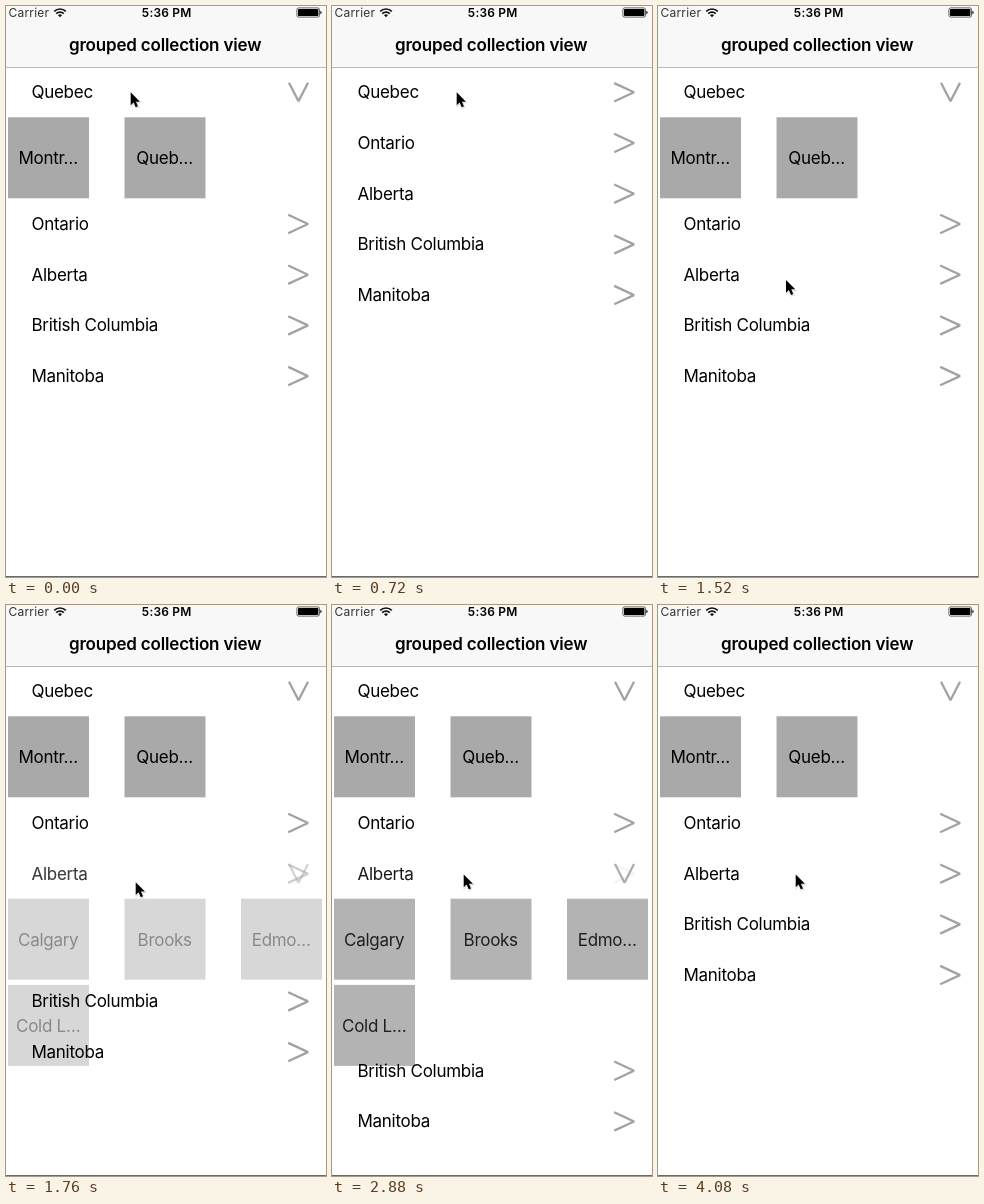
Animation, 320 px wide and 571 px high, one loop 4960 ms. Source, as an HTML page:

```html
<!DOCTYPE html>
<html lang="en">
<head>
<meta charset="utf-8">
<title>Grouped collection view</title>
<style>
  html, body { margin: 0; width: 100%; height: 100%; overflow: hidden; background: #fff; }
  svg { display: block; width: 100%; height: 100%; font-family: Inter, Roboto, sans-serif; }
  .label { font-size: 17px; letter-spacing: -.28px; }
  .cell { text-anchor: middle; }
  .status { font-size: 12px; letter-spacing: .2px; }
  .arrow { fill: none; stroke: #a2a2a2; stroke-width: 2.3; stroke-linejoin: bevel; }
</style>
</head>
<body>
<svg id="stage" viewBox="0 0 320 571">
  <rect width="320" height="571" fill="#fff"/>
  <g id="cells"></g>
  <g id="headers"></g>

  <rect width="320" height="61" fill="#f8f8f8"/>
  <rect y="61" width="320" height="1" fill="#b9b9b9"/>
  <rect y="570" width="320" height="1" fill="#6a6a6a"/>
  <text x="2.5" y="11" class="status" fill="#333">Carrier</text>
  <g fill="none" stroke="#111" stroke-width="1.7">
    <path d="M48.2 5.4a8.2 8.2 0 0 1 11.6 0M50.2 7.6a5.4 5.4 0 0 1 7.6 0"/>
    <path d="M54 11.3L52 9.2a2.9 2.9 0 0 1 4 0Z" fill="#111" stroke="none"/>
  </g>
  <text x="160.7" y="11" class="status" font-weight="600" text-anchor="middle">5:36 PM</text>
  <rect x="290.9" y="1.9" width="22.6" height="9.2" rx="1.8" fill="none" stroke="#000" stroke-width=".6"/>
  <rect x="292" y="3" width="20.4" height="7" rx=".8"/>
  <path d="M314.4 4.8a1.8 1.8 0 0 1 0 3.4Z"/>
  <text x="159.1" y="44.5" font-size="17" font-weight="600" letter-spacing="-.18" text-anchor="middle">grouped collection view</text>

  <g id="cursor">
    <path d="M.6 1.4V15.6L3.8 12.6L6.2 18L9 16.8L6.7 11.6H11Z" opacity=".14" stroke="#000" stroke-width="1.6"/>
    <path d="M0 0V14.6L3.3 11.5L5.7 17L8.3 15.9L6 10.6H10.5Z" stroke="#fff" stroke-width="1.2" paint-order="stroke"/>
  </g>
</svg>
<script>
const LOOP = 4960, STEP = 80, TOP = 86.3, ROW = 50.7, SIDE = 81, GAP = 86.2;
const COLUMNS = [2, 118.5, 235];

const groups = [
  { name: "Quebec", items: ["Montr…", "Queb…"], y: TOP, grow: 81 },
  { name: "Ontario" },
  { name: "Alberta", items: ["Calgary", "Brooks", "Edmo…", "Cold L…"], y: TOP + 2 * ROW + 81, grow: 167.2 },
  { name: "British Columbia" },
  { name: "Manitoba" }
];

// Pointer stops: time, x, y
const pointer = [
  [0, 124.7, 86.3], [1060, 124.7, 86.3], [1520, 128, 274], [1600, 129.7, 277.2],
  [2160, 129.7, 277.2], [2320, 131.7, 269.4], [3840, 131.7, 269.4], [4080, 137.7, 269.4]
];

const byId = id => document.getElementById(id);

function add(parent, tag, attrs, text) {
  const el = document.createElementNS("http://www.w3.org/2000/svg", tag);
  for (const key in attrs) el.setAttribute(key, attrs[key]);
  if (text) el.textContent = text;
  return parent.appendChild(el);
}

function ease(t, from, to) {
  const x = Math.min(1, Math.max(0, (t - from) / (to - from)));
  return x * x * (3 - 2 * x);
}

function buildCells(group) {
  const box = add(byId("cells"), "g", {});
  group.items.forEach((name, i) => {
    const x = COLUMNS[i % 3], y = group.y + 25 + Math.floor(i / 3) * GAP;
    add(box, "rect", { x, y, width: SIDE, height: SIDE, fill: "#a9a9a9" });
    add(box, "text", { x: x + SIDE / 2 - .3, y: y + 47, class: "label cell" }, name);
  });
  return box;
}

function buildFace(parent, name, arrow) {
  const face = add(parent, "g", {});
  add(face, "text", { x: 25.5, y: 6, class: "label" }, name);
  add(face, "path", { d: arrow, class: "arrow" });
  return face;
}

for (const group of groups) {
  if (group.items) group.cells = buildCells(group);
  group.node = add(byId("headers"), "g", {});
  group.closed = buildFace(group.node, group.name, "M282.2 -9.2L302 0L282.2 9.2");
  group.opened = buildFace(group.node, group.name, "M283 -9.6L292.5 9L302 -9.6");
}

function openness(name, t) {
  if (name === "Quebec") return 1 - ease(t, 490, 720) + ease(t, 960, 1178);
  if (name === "Alberta") return ease(t, 1616, 1920) - ease(t, 2812, 3120);
  return 0;
}

function pointerAt(t) {
  const i = pointer.findIndex(stop => stop[0] > t);
  if (i < 0) return pointer[pointer.length - 1].slice(1);
  const [t0, x0, y0] = pointer[i - 1], [t1, x1, y1] = pointer[i];
  const k = ease(t, t0, t1);
  return [x0 + (x1 - x0) * k, y0 + (y1 - y0) * k];
}

function draw(time) {
  const t = Math.floor((time % LOOP) / STEP) * STEP;
  let y = TOP;
  for (const group of groups) {
    const open = openness(group.name, t);
    group.node.setAttribute("transform", `translate(0 ${y})`);
    group.closed.setAttribute("opacity", 1 - open);
    group.opened.setAttribute("opacity", open);
    if (group.cells) group.cells.setAttribute("opacity", open);
    y += ROW + (group.grow || 0) * open;
  }
  byId("cursor").setAttribute("transform", `translate(${pointerAt(t)}) scale(.88)`);
}

const start = performance.now();
function tick() {
  draw(performance.now() - start);
  requestAnimationFrame(tick);
}
tick();
</script>
</body>
</html>
```
